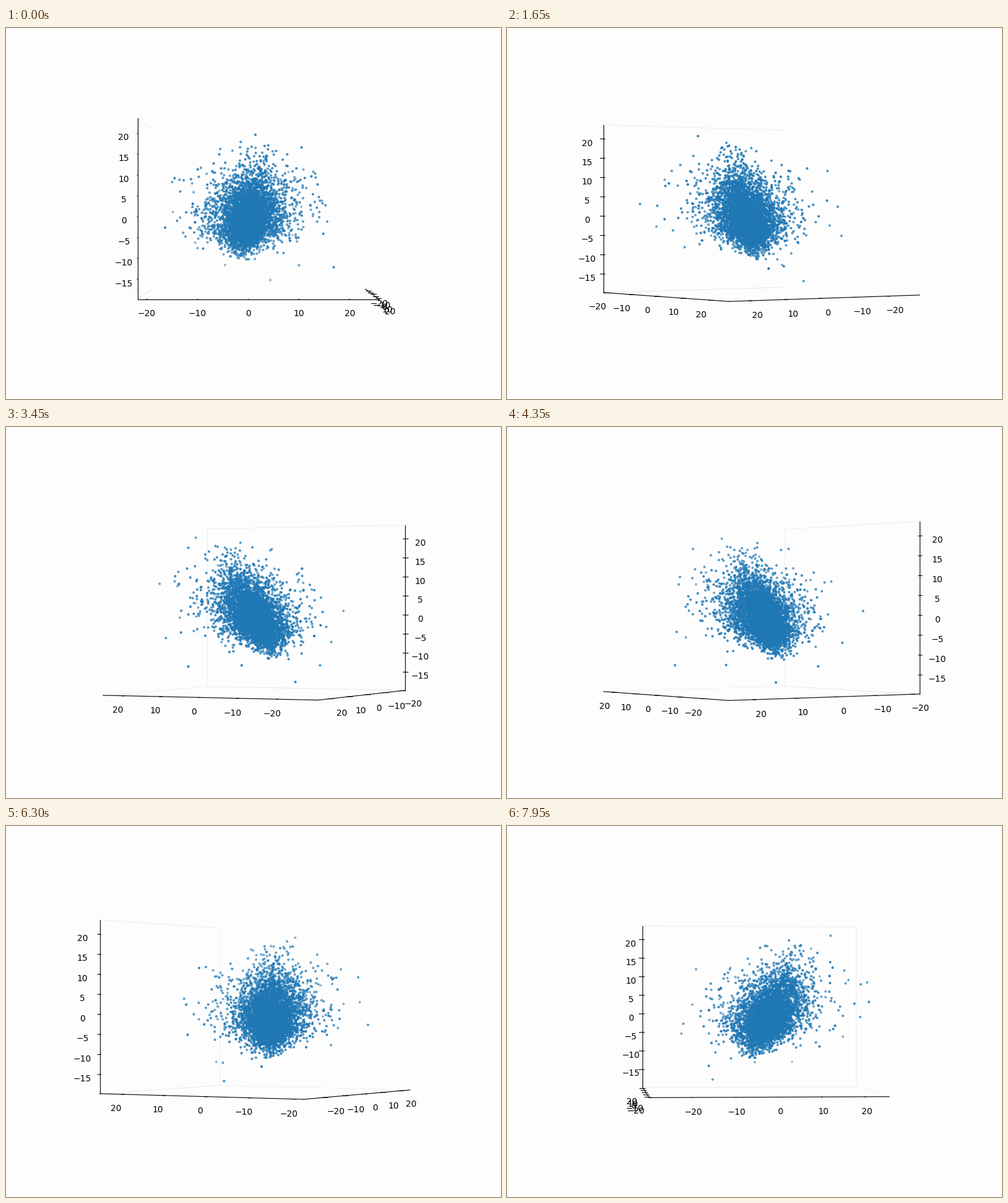
Animation, 800 px wide and 600 px high, one loop 8 s. Source, as a matplotlib script:

```python
import matplotlib.pyplot as plt
import numpy as np
from matplotlib.animation import FuncAnimation

WIDTH, HEIGHT, DPI = 800, 600, 100
PAD = 15
LOOP_MS, TICK_MS, HOLD = 8000, 50, 3  # each view is held for three ticks
DEGREES_PER_VIEW = 5
BACKGROUND = "#fdfdfd"
LIMITS = {"xlim": (-30, 25.72), "ylim": (-21.87, 25.83), "zlim": (-19.8, 23.64)}


def make_core(rng, count):
    """Teardrop cloud: narrow at the bottom, wider and tilted towards the top."""
    z = 2.2 * (rng.gamma(4, size=count) - 4) + 1.9 * rng.normal(size=count)
    width = np.clip(0.65 + 0.03 * (z + 9), 0.55, 1.15)
    spread = width * rng.lognormal(0, 0.45, count)
    x = 0.35 * z + 3.5 * spread * rng.normal(size=count)
    y = 0.12 * z + 3.2 * spread * rng.normal(size=count)
    keep = (abs(x) < 18) & (abs(y) < 17) & (abs(z - 3) < 16)
    return np.array([x, y, z])[:, keep]


def make_strays(rng, count):
    """Lone points outside the core, low at negative x and high at positive x."""
    t = rng.uniform(-1, 1, count)
    x = 24 * t + rng.normal(0, 3, count)
    y = rng.normal(0, 9, count)
    z = 10 * t + rng.normal(0, 7, count)
    outside = (x / 16) ** 2 + (y / 14) ** 2 + (z / 16) ** 2 > 1
    inside_box = (abs(x) < 25) & (abs(y) < 21) & (abs(z - 2) < 19)
    return np.array([x, y, z])[:, outside & inside_box]


def make_axes(fig):
    rect = [PAD / WIDTH, PAD / HEIGHT, 1 - 2 * PAD / WIDTH, 1 - 2 * PAD / HEIGHT]
    ax = fig.add_axes(rect, projection="3d", facecolor=BACKGROUND)
    rng = np.random.default_rng(4)
    ax.scatter(*np.hstack([make_core(rng, 5000), make_strays(rng, 60)]), s=4)
    ax.set(**LIMITS, xticks=range(-20, 21, 10), yticks=range(-20, 21, 10),
           zticks=range(-15, 21, 5))
    ax.grid(False)
    for axis in (ax.xaxis, ax.yaxis, ax.zaxis):
        axis.pane.fill = False
    ax.xaxis.pane.set_edgecolor(BACKGROUND)
    return ax


def render_view(index):
    ax.view_init(elev=0, azim=DEGREES_PER_VIEW * index)
    fig.canvas.draw()
    return np.array(fig.canvas.buffer_rgba())


fig = plt.figure(figsize=(WIDTH / DPI, HEIGHT / DPI), dpi=DPI,
                 facecolor=BACKGROUND)
ax = make_axes(fig)

# Held views repeat, so each is rendered only once.
ticks = LOOP_MS // TICK_MS
views = [render_view(i) for i in range(-(-ticks // HOLD))]
ax.remove()
picture = fig.figimage(views[0], origin="upper")


def update(tick):
    picture.set_data(views[tick // HOLD])
    return [picture]


animation = FuncAnimation(fig, update, frames=ticks, interval=TICK_MS,
                          repeat=True, repeat_delay=0)
plt.show()
```
